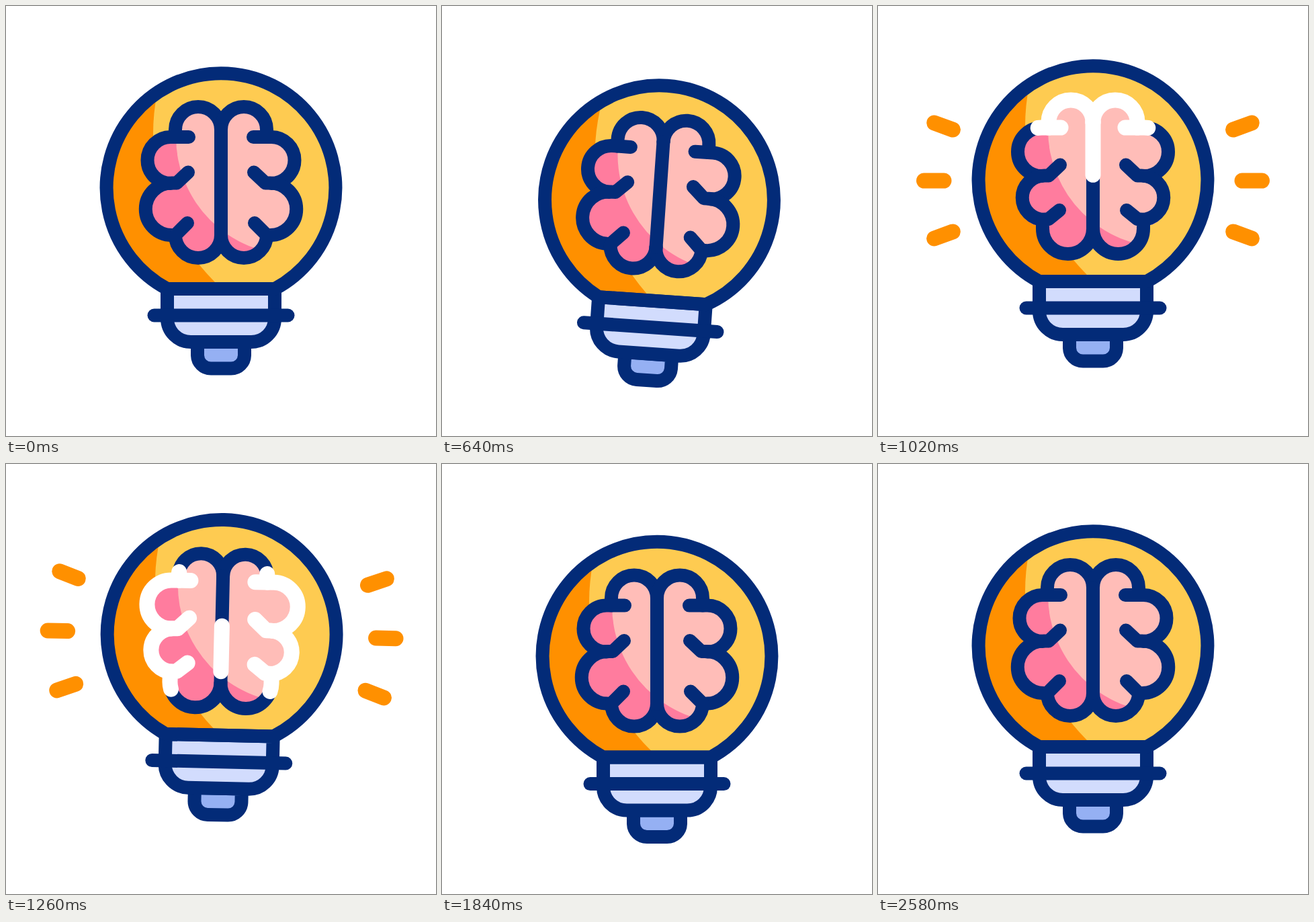
Animation, 640 px wide and 640 px high, one loop 2760 ms. Source, as an HTML page:

```html
<!DOCTYPE html>
<html lang="en">
<head>
<meta charset="utf-8">
<title>Bright idea</title>
<style>
  html, body { margin: 0; height: 100%; overflow: hidden; background: #fff; }
  svg { display: block; width: 100vw; height: 100vh; }
  .line { fill: none; stroke: #032b78; stroke-width: 20; stroke-linecap: round; stroke-linejoin: round; }
  .glow { fill: none; stroke: #fff; stroke-width: 23; stroke-linecap: round; stroke-linejoin: round; }
  #rays { stroke: #ff9000; stroke-width: 23; stroke-linecap: round; }
</style>
</head>
<body>
<svg viewBox="0 0 640 640">
  <defs>
    <clipPath id="glass"><path d="M240 421A170.4 170.4 0 1 1 400 421Z"/></clipPath>
    <clipPath id="brain">
      <path id="side" d="M320 184A34 34 0 0 0 252 184V195H245A34.5 34.5 0 0 0 245 264V265A37 37 0 0 0 246 339H252V341A34 34 0 0 0 320 341Z"/>
      <use href="#side" transform="matrix(-1 0 0 1 640 0)"/>
    </clipPath>
  </defs>
  <g id="bulb">
    <g id="rays"></g>
    <g clip-path="url(#glass)">
      <rect x="140" y="90" width="360" height="340" fill="#ff9000"/>
      <circle cx="530.4" cy="190" r="311.4" fill="#fecb51"/>
    </g>
    <g class="line">
      <path d="M285 500V520A20 20 0 0 0 305 539.5H335A20 20 0 0 0 355 520V500Z" fill="#95b0f3"/>
      <path d="M240 421V465A35 35 0 0 0 275 500H365A35 35 0 0 0 400 465V421Z" fill="#d2dcfd"/>
      <path d="M220.5 460.5H419.5"/>
      <path d="M240 421A170.4 170.4 0 1 1 400 421Z"/>
    </g>
    <g clip-path="url(#brain)">
      <rect x="190" y="140" width="260" height="250" fill="#ff7c9e"/>
      <circle cx="428.3" cy="195" r="175.3" fill="#ffbdb8"/>
    </g>
    <g class="line">
      <g id="folds"></g>
      <use href="#folds" transform="matrix(-1 0 0 1 640 0)"/>
      <path d="M320 184V341"/>
    </g>
    <g class="glow">
      <g id="sweep"></g>
      <use href="#sweep" transform="matrix(-1 0 0 1 640 0)"/>
      <path id="stem" d="M320 184V342" pathLength="1"/>
    </g>
  </g>
</svg>
<script>
const LOOP = 2760;
const $ = id => document.getElementById(id);

function add(parent, tag, attrs = {}) {
  const el = document.createElementNS('http://www.w3.org/2000/svg', tag);
  for (const k in attrs) el.setAttribute(k, attrs[k]);
  return parent.appendChild(el);
}

// Monotone cubic curve through [time, value] pairs, flat at its extremes.
function track(...keys) {
  const rise = i => (keys[i + 1][1] - keys[i][1]) / (keys[i + 1][0] - keys[i][0]);
  const slopes = keys.map((_, i) => {
    if (i === 0 || i === keys.length - 1) return 0;
    const a = rise(i - 1), b = rise(i);
    return a * b > 0 ? 2 * a * b / (a + b) : 0;
  });
  return t => {
    if (t <= keys[0][0]) return keys[0][1];
    const i = keys.findIndex(k => k[0] > t) - 1;
    if (i < 0) return keys[keys.length - 1][1];
    const [t0, v0] = keys[i], [t1, v1] = keys[i + 1];
    const d = t1 - t0, u = (t - t0) / d, w = 1 - u;
    return v0 * w * w * (1 + 2 * u) + v1 * u * u * (3 - 2 * u)
      + d * u * w * (slopes[i] * w - slopes[i + 1] * u);
  };
}

const shift = track([220, 0], [480, 32.5], [640, 18], [740, 7], [1020, -11], [1280, -17.5],
  [1500, -20], [1770, 20], [2040, -6.5], [2280, 6.6], [2580, 0]);
const tilt = track([220, 0], [480, 5], [640, 4], [1020, 0], [1220, 1.5], [1480, -1.6], [1770, 0]);
const swell = track([740, 0], [1020, 1], [1500, 1.1], [1790, 0]);
const head = track([770, 0], [1020, .31], [1400, 1]);
const tail = track([1080, 0], [1520, .81], [1640, 1]);
const rayIn = track([780, 165], [1020, 222], [1220, 229.5]);
const rayOut = track([780, 165], [1020, 251.5], [1220, 259], [1460, 259], [1520, 257], [1720, 229.5]);

const rays = [-20, 0, 20, 160, 180, 200].map(a =>
  add($('rays'), 'line', { y1: 271, y2: 271, transform: `rotate(${a} 320 271)` }));
const folds = [0, 1, 2, 3].map(() => add($('folds'), 'path'));
const sweep = [0, 1, 2, 3].map(() => add($('sweep'), 'path', { pathLength: 1 }));

// Left half of the brain, top lobe to bottom lobe; m is the swelling.
function lobes(m) {
  const mix = (a, b) => a + (b - a) * m;
  const arc = (r, x, y) => `A${r} ${r} 0 0 0 ${x} ${y}`;
  const top = mix(34, 33), stub = mix(195, 192), upX = mix(245, 244);
  const lowX = mix(246.5, 247.5), lowY = mix(341, 329);
  const bot = mix(34, 37.5), botX = 320 - 2 * bot, botY = mix(341, 342.5);
  return [
    `M320 184${arc(top, 320 - 2 * top, 184)}V${stub}`,
    `M272 ${stub}H${upX}${arc((264 - stub) / 2, upX, 264)}`,
    `M271 247.5L254 263.5H${lowX}${arc((lowY - 263.5) / 2, lowX, lowY)}`,
    `M270 ${mix(323, 315)}L${mix(253, 254)} ${mix(340, 328)}L${botX} ${lowY}V${botY}${arc(bot, 320, botY)}`
  ];
}

function trim(el, from, to) {
  const clamp = v => Math.min(1, Math.max(0, v));
  const a = clamp(from), b = clamp(to);
  el.style.display = b - a > .001 ? '' : 'none';
  el.setAttribute('stroke-dasharray', `${b - a} 2`);
  el.setAttribute('stroke-dashoffset', -a);
}

function draw(t) {
  $('bulb').setAttribute('transform', `translate(0 ${shift(t)}) rotate(${tilt(t)} 320 320)`);

  $('rays').style.display = t > 780 && t < 1720 ? '' : 'none';
  for (const ray of rays) {
    ray.setAttribute('x1', 320 + rayIn(t));
    ray.setAttribute('x2', 320 + rayOut(t));
  }

  const h = head(t), e = tail(t);
  lobes(swell(t)).forEach((d, i) => {
    folds[i].setAttribute('d', d);
    sweep[i].setAttribute('d', d);
    trim(sweep[i], e * 4 - i, h * 4 - i);
  });
  trim($('stem'), e ** .5, h ** .6);
}

const start = performance.now();
function tick() {
  const t = (performance.now() - start) % LOOP;
  draw(Math.floor(t / 20) * 20);
  requestAnimationFrame(tick);
}
tick();
</script>
</body>
</html>
```
